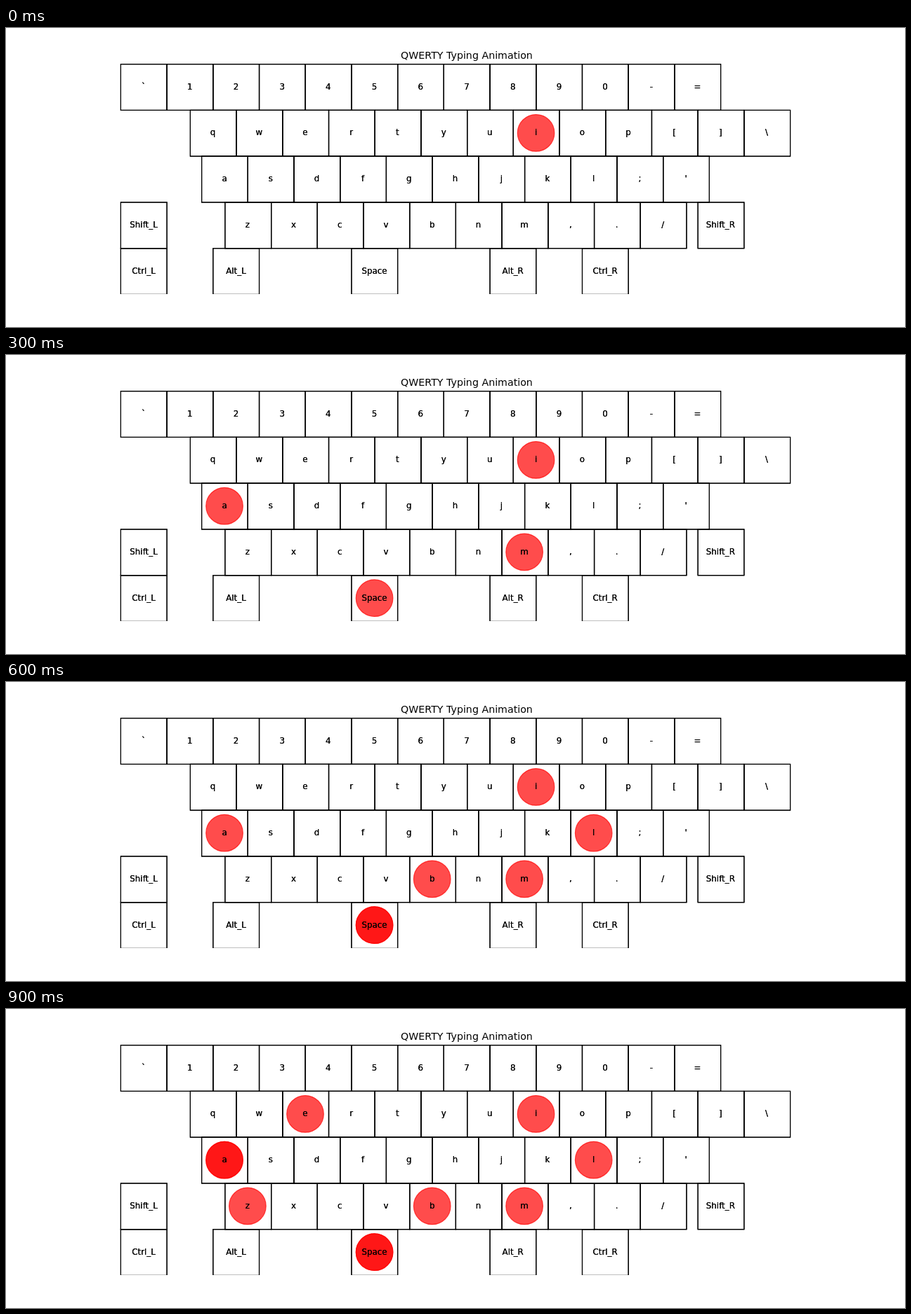
Recreate the animation shown at these times as an HTML page. Size 1280x427 px, loop 1000 ms.

```html
<!DOCTYPE html>
<html lang="en">
<head>
<meta charset="utf-8">
<title>QWERTY Typing Animation</title>
<style>
  @property --step { syntax: "<number>"; inherits: true; initial-value: 0; }
  html, body { margin: 0; width: 100%; height: 100%; overflow: hidden; background: #fff; }
  svg { display: block; width: 1280px; height: 427px; animation: type 1s steps(10) infinite; }
  text { font-family: "DejaVu Sans", Verdana, sans-serif; font-size: 13.89px; text-anchor: middle; }
  .title { font-size: 16.67px; }
  rect.key { fill: none; stroke: #000; stroke-width: 1.39; }
  circle {
    fill: red; stroke: red; stroke-width: 1.39;
    fill-opacity: .7; stroke-opacity: .7;
    opacity: clamp(0, var(--step) - var(--at) + .5, 1);
  }
  @keyframes type { from { --step: 0; } to { --step: 10; } }
</style>
</head>
<body>
<svg viewBox="0 0 1500 500" preserveAspectRatio="none">
  <clipPath id="board"><rect x="190" y="59" width="1160" height="386.1"/></clipPath>
  <text class="title" x="768.75" y="51.7">QWERTY Typing Animation</text>
  <g id="keys" clip-path="url(#board)"></g>
  <g id="presses"></g>
  <g id="labels"></g>
</svg>
<script>
const UNIT = 77, LEFT = 191.25, TOP = 60;
const layer = id => document.getElementById(id);
const snap = v => Math.floor(v + .5) + .5;
const centers = {};

function add(parent, tag, attrs, label = "") {
  const el = document.createElementNS("http://www.w3.org/2000/svg", tag);
  for (const name in attrs) el.setAttribute(name, attrs[name]);
  el.textContent = label;
  layer(parent).append(el);
  return el;
}

function addKey(label, col, row) {
  const x = LEFT + col * UNIT, y = TOP + row * UNIT;
  const cx = x + UNIT / 2, cy = y + UNIT / 2;
  centers[label] = [cx, cy];
  // Every key is inked twice, which darkens its soft edges.
  for (let pass = 0; pass < 2; pass++) {
    add("keys", "rect", { class: "key", x: snap(x), y: snap(y), width: UNIT, height: UNIT });
    add("labels", "text", { x: cx, y: cy + 4 }, label);
  }
}

const rows = [[0, "`1234567890-="], [1.5, "qwertyuiop[]\\"], [1.75, "asdfghjkl;'"], [2.25, "zxcvbnm,./"]];
rows.forEach(([start, chars], row) =>
  [...chars].forEach((c, i) => addKey(c, start + i, row)));

addKey("Shift_L", 0, 3);
addKey("Shift_R", 12.5, 3);
const bottom = { Ctrl_L: 0, Alt_L: 2, Space: 5, Alt_R: 8, Ctrl_R: 10 };
for (const label in bottom) addKey(label, bottom[label], 4);

// Each typed character leaves a translucent mark; repeats deepen it.
[..."i am blaze"].forEach((c, i) => {
  const [cx, cy] = centers[c === " " ? "Space" : c];
  // Half-step offset keeps the switch on either side of the step values.
  add("presses", "circle", { cx, cy, r: UNIT * .4 }).style.setProperty("--at", i - .5);
});
</script>
</body>
</html>
```
